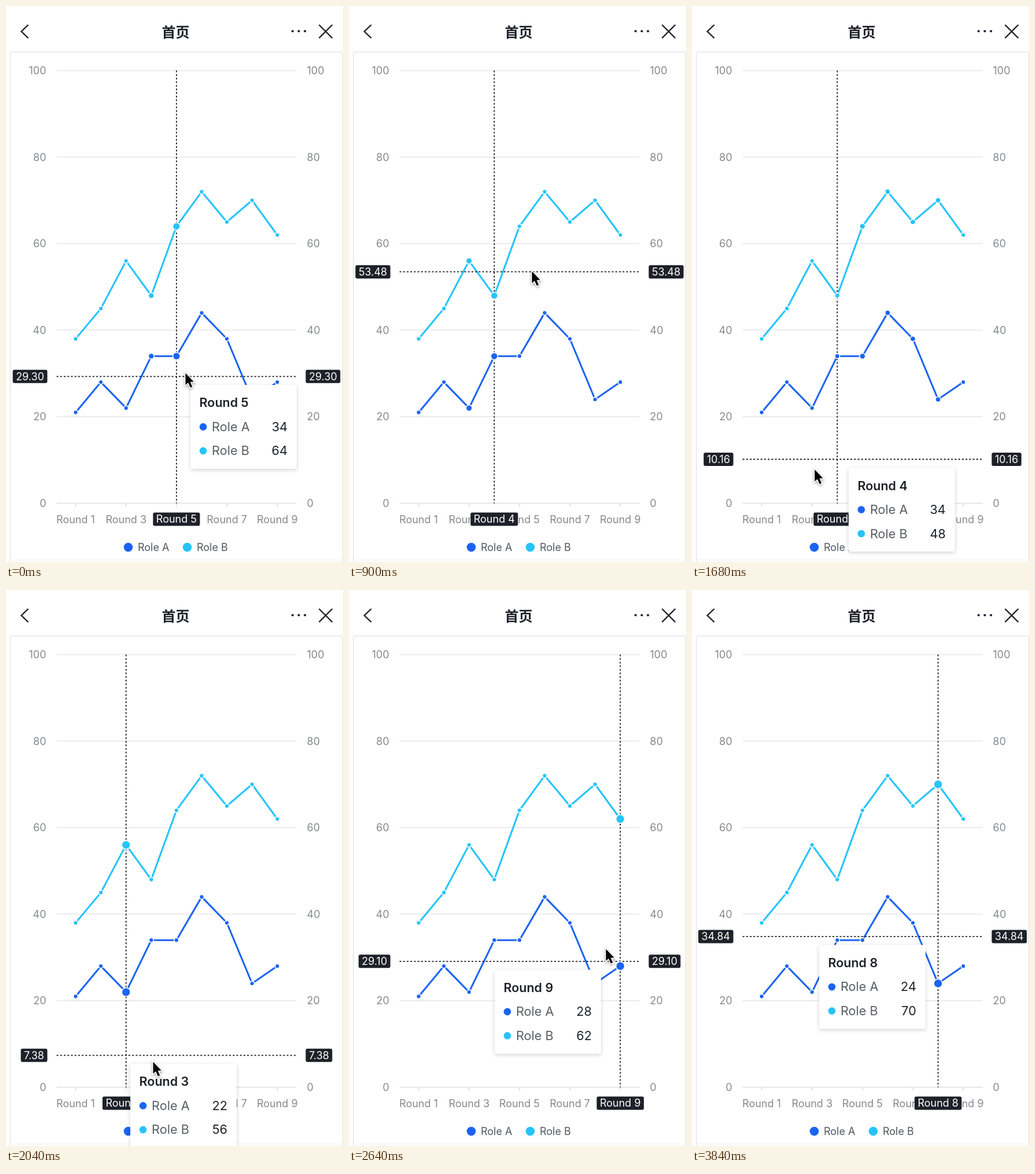
An HTML page with a canvas that plays this animation: 583x961 px, repeating every 3.9 s.

```html
<!DOCTYPE html>
<html lang="zh">
<head>
<meta charset="utf-8">
<style>
  html, body { margin: 0; width: 100%; height: 100%; overflow: hidden; background: #fff; }
  canvas { display: block; }
</style>
</head>
<body>
<canvas id="stage" width="583" height="961"></canvas>
<script>
const ctx = document.getElementById('stage').getContext('2d');
const LOOP = 3900, STEP = 60;
const LAG = 120;      // the chart trails the pointer
const FADE = 300;     // growth time of a highlighted point
const UNIT = 1.555;   // one layout pixel on the stage
const INK = '#1f2129', GRAY = '#86888f', BLUE = '#1b64f2', CYAN = '#26c4fb';
const FONT = 'Inter, "Noto Sans CJK SC", "Noto Sans CJK", sans-serif';
const LEFT = 87, RIGHT = 502, TOP = 111, BOTTOM = 859;
const TIP = { width: 184, height: 145, gap: 10 * UNIT };

const roleA = { name: 'Role A', color: BLUE, data: [21, 28, 22, 34, 34, 44, 38, 24, 28] };
const roleB = { name: 'Role B', color: CYAN, data: [38, 45, 56, 48, 64, 72, 65, 70, 62] };

// Turning points of the pointer: time, x, y
const path = [
  [-480, 250, 670], [-120, 303, 639.84], [0, 310, 634], [180, 280, 550.9],
  [300, 254, 570], [480, 210, 500], [780, 256, 458.97], [900, 316, 458],
  [1000, 455, 520], [1140, 457, 610.66], [1260, 454, 698], [1620, 215, 800],
  [1920, 199, 803.8], [2040, 254, 815], [2220, 460, 740], [2520, 451, 641.33],
  [2640, 444, 620], [3000, 419, 598.4], [LOOP, 419, 598.4]
];

const xOf = round => 120 + 43.6 * (round - 1);
const yOf = value => BOTTOM - value * (BOTTOM - TOP) / 100;
const valueOf = y => (BOTTOM - y) * 100 / (BOTTOM - TOP);
const roundOf = x => Math.min(9, Math.max(1, Math.round((x - 120) / 43.6) + 1));

function positionAt(t) {
  const i = path.findIndex(key => key[0] > t);
  const [t0, x0, y0] = path[i - 1], [t1, x1, y1] = path[i];
  const k = (t - t0) / (t1 - t0);
  return { x: x0 + (x1 - x0) * k, y: y0 + (y1 - y0) * k };
}

// Share of the fade time during which a round was highlighted.
function emphasis(round, t) {
  let hits = 0;
  for (let i = 0; i < 10; i++) hits += roundOf(positionAt(t - i * FADE / 10).x) === round;
  return hits / 10;
}

function text(str, x, y, color, { size = 18, weight = 400, align = 'left' } = {}) {
  ctx.font = `${weight} ${size}px ${FONT}`;
  ctx.fillStyle = color;
  ctx.textAlign = align;
  ctx.textBaseline = 'middle';
  ctx.fillText(str, x, y + 1);
}

function dot(x, y, r, color) {
  ctx.fillStyle = color;
  ctx.beginPath();
  ctx.arc(x, y, r, 0, 7);
  ctx.fill();
}

function polyline(points, color, width, dash = []) {
  ctx.strokeStyle = color;
  ctx.lineWidth = width;
  ctx.setLineDash(dash);
  ctx.beginPath();
  points.forEach(p => ctx.lineTo(...p));
  ctx.stroke();
  ctx.setLineDash([]);
}

const crosshair = (from, to) => polyline([from, to], INK, 1.8, [2 * UNIT, 2 * UNIT]);

function box(x, y, w, h, r, color) {
  ctx.fillStyle = color;
  ctx.beginPath();
  ctx.roundRect(x, y, w, h, r);
  ctx.fill();
}

function shadow(color, blur, dy) {
  ctx.shadowColor = color;
  ctx.shadowBlur = blur;
  ctx.shadowOffsetY = dy;
}

// Dark label; anchor is the share of its width that lies left of x.
function badge(str, x, y, anchor) {
  ctx.font = `400 18px ${FONT}`;
  const w = ctx.measureText(str).width + 11;
  const left = x - w * anchor;
  box(left, y - 11.5, w, 23, 3, INK);
  text(str, left + w / 2, y, '#fff', { align: 'center' });
}

function drawHeader() {
  polyline([[38, 32], [26, 43.5], [38, 55]], INK, 2.4);
  text('首页', 293, 45, INK, { size: 24, weight: 700, align: 'center' });
  for (let i = -1; i <= 1; i++) dot(506 + 10.7 * i, 43, 2.1, INK);
  polyline([[541, 32], [564, 55]], INK, 2.4);
  polyline([[564, 32], [541, 55]], INK, 2.4);
  ctx.strokeStyle = '#e5e6e8';
  ctx.lineWidth = UNIT;
  ctx.beginPath();
  ctx.roundRect(7, 79, 575, 900, 4);
  ctx.stroke();
  polyline([[8, 957], [581, 957]], '#f3f3f4', UNIT);
}

function drawAxes() {
  for (let v = 0; v <= 100; v += 20) {
    const y = yOf(v);
    polyline([[LEFT, y], [RIGHT, y]], v ? '#ececee' : '#e4e5e7', 2);
    text(v, 69, y, GRAY, { align: 'right' });
    text(v, 520, y, GRAY);
  }
  for (let r = 1; r <= 9; r += 2) {
    polyline([[xOf(r), BOTTOM], [xOf(r), BOTTOM + 6]], '#dcdde0', UNIT);
    text('Round ' + r, xOf(r), 887, GRAY, { align: 'center' });
  }
  [roleA, roleB].forEach((role, i) => {
    const x = 211 + 102 * i;
    dot(x, 935, 7.8, role.color);
    text(role.name, x + 16.5, 935, '#54575f');
  });
}

function drawChart(t, y, round) {
  const x = xOf(round), label = valueOf(y).toFixed(2);
  const roles = [roleB, roleA];
  roles.forEach(({ data, color }) =>
    polyline(data.map((v, i) => [xOf(i + 1), yOf(v)]), color, 2 * UNIT));
  crosshair([x, TOP], [x, BOTTOM]);
  crosshair([LEFT, y], [RIGHT, y]);
  roles.forEach(({ data, color }) => data.forEach((v, i) => {
    const r = 3.1 + 3.6 * emphasis(i + 1, t);
    dot(xOf(i + 1), yOf(v), r + UNIT, '#fff');
    dot(xOf(i + 1), yOf(v), r, color);
  }));
  badge(label, 71, y, 1);
  badge(label, 518, y, 0);
  badge('Round ' + round, x, 886.5, 0.5);
}

function drawTooltip(at, round) {
  const fits = at.x + TIP.gap + TIP.width < 582;
  const x = fits ? at.x + TIP.gap : at.x - TIP.gap - TIP.width;
  const y = at.y + TIP.gap - 1;
  shadow('rgba(0,0,0,.18)', 7, 2);
  box(x, y, TIP.width, TIP.height, 4, '#fff');
  shadow('transparent', 0, 0);
  text('Round ' + round, x + 15.5, y + 31, INK, { size: 21.5, weight: 600 });
  [roleA, roleB].forEach((role, i) => {
    const rowY = y + 72.5 + 41.5 * i;
    dot(x + 22, rowY, 6.3, role.color);
    text(role.name, x + 37, rowY, '#5b5e66', { size: 21.7 });
    text(role.data[round - 1], x + 168, rowY, INK, { size: 21.7, align: 'right' });
  });
}

function drawPointer(x, y) {
  ctx.save();
  ctx.translate(x, y);
  ctx.beginPath();
  [[0, 0], [0, 20.5], [4.6, 16.6], [8.4, 25], [11.8, 23.5], [8.2, 15.2], [14.3, 15]]
    .forEach(p => ctx.lineTo(...p));
  ctx.closePath();
  ctx.lineWidth = 3;
  ctx.strokeStyle = '#fff';
  shadow('rgba(0,0,0,.4)', 4, 1.5);
  ctx.stroke();
  shadow('transparent', 0, 0);
  ctx.fillStyle = '#000';
  ctx.fill();
  ctx.restore();
}

function draw(now) {
  const t = Math.floor(now % LOOP / STEP) * STEP;
  const pointer = positionAt(t), at = positionAt(t - LAG);
  const round = roundOf(at.x);
  const exit = 2 * Math.max(0, t - 3300);
  ctx.setTransform(1, 0, 0, 1, 0, 0);
  ctx.fillStyle = '#fff';
  ctx.fillRect(0, 0, 583, 961);
  ctx.translate(0.5, 0.5);
  drawHeader();
  drawAxes();
  drawChart(t - LAG, at.y, round);
  if (t < 180 || t >= 1080) drawTooltip(at, round);
  drawPointer(pointer.x, pointer.y + exit);
}

const start = performance.now();
function tick() {
  draw(performance.now() - start);
  requestAnimationFrame(tick);
}
tick();
</script>
</body>
</html>
```
